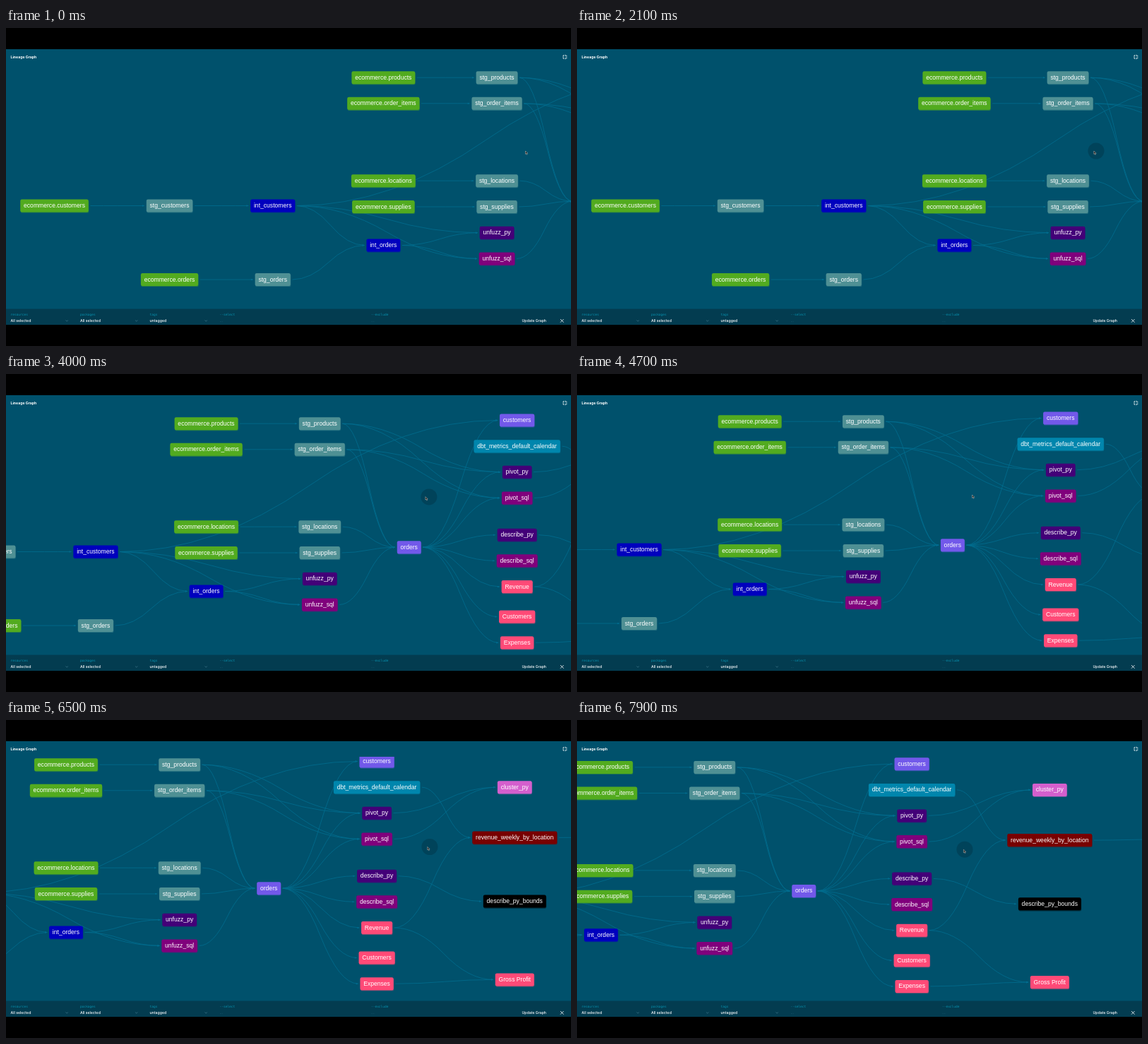
These frames come from a looping animation (800x450 px, 8000 ms). An HTML page:

```html
<!DOCTYPE html>
<html lang="en">
<head>
<meta charset="utf-8">
<title>Lineage Graph</title>
<style>
  html, body { margin: 0; height: 100%; overflow: hidden; background: #000; }
  svg { display: block; width: 800px; height: 450px; }
  #graph text { font: 8.6px "Liberation Sans", Arial, sans-serif; text-anchor: middle; fill: #fff; }
  #edges { fill: none; stroke: #027599; stroke-width: .8; opacity: .8; }
  #edges .tip { fill: #027599; stroke: none; }
  .ui text { font: 500 5.2px Inter, sans-serif; fill: #fff; }
  .ui .label { font: 4.5px "DejaVu Sans Mono", monospace; fill: #0893b0; }
  .ui path { fill: none; stroke: #fff; stroke-width: .8; }
  .ui .chevron { stroke: #4d8497; stroke-width: .6; }
  .ui .hint { fill: #2a6a7f; }
</style>
</head>
<body>
<svg viewBox="0 0 800 450">
  <clipPath id="view"><rect y="52" width="800" height="346"/></clipPath>
  <rect y="30" width="800" height="390" fill="#00516c"/>
  <g clip-path="url(#view)">
    <g id="graph"><g id="edges"></g><g id="nodes"></g></g>
  </g>
  <g class="ui" id="ui">
    <rect y="397.5" width="800" height="22.5" fill="#033c50"/>
    <text x="6.5" y="43" style="font-weight:700">Lineage Graph</text>
    <path d="M788 39.8h2v-2M794.500 39.800h-2v-2M788 42.200h2v2M794.500 42.200h-2v2"/>
    <text x="730.5" y="416">Update Graph</text>
    <path d="M785 412l4.600 4.600M789.600 412l-4.600 4.600"/>
  </g>
  <circle id="press" r="11.5" fill="#002f42" opacity=".4"/>
  <path id="cursor" d="M0 0V4.400L1 3.500 1.800 5.200 2.600 4.800 1.800 3.200H3.200Z" fill="#111" stroke="#d8d0c8" stroke-width=".5"/>
</svg>
<script>
const LOOP = 8000;
const $ = id => document.getElementById(id);
const green = '#52ab1f', teal = '#4f9094', blue = '#0000be', indigo = '#430078',
      purple = '#80007c', violet = '#7259ea', pink = '#ff4a77';

// Columns of the graph: centre x, then [label, y, colour]
const columns = [
  [68.5, ['ecommerce.customers', 251.5, green]],
  [231.5, ['stg_customers', 251.5, teal], ['ecommerce.orders', 356, green]],
  [377.7, ['int_customers', 251.5, blue], ['stg_orders', 356, teal]],
  [534.3, ['ecommerce.products', 70.2, green], ['ecommerce.order_items', 106.8, green],
    ['ecommerce.locations', 216.2, green], ['ecommerce.supplies', 253, green], ['int_orders', 307.5, blue]],
  [695, ['stg_products', 70.2, teal], ['stg_order_items', 106.8, teal], ['stg_locations', 216.2, teal],
    ['stg_supplies', 253, teal], ['unfuzz_py', 289.7, indigo], ['unfuzz_sql', 326.4, purple]],
  [821.5, ['orders', 245.2, violet]],
  [974.4, ['customers', 65.5, violet], ['dbt_metrics_default_calendar', 102.2, '#0086ad'],
    ['pivot_py', 138.7, indigo], ['pivot_sql', 175.4, purple], ['describe_py', 227.7, indigo],
    ['describe_sql', 264.3, purple], ['Revenue', 301, pink], ['Customers', 343.5, pink], ['Expenses', 380.2, pink]],
  [1169.6, ['cluster_py', 102.2, '#d45fcd'], ['revenue_weekly_by_location', 173.4, '#780000'],
    ['describe_py_bounds', 263.6, '#000'], ['Gross Profit', 374.4, pink]],
  [1345, ['', 172, '#000']]
];
const links = {
  'ecommerce.customers': 'stg_customers', 'stg_customers': 'int_customers',
  'ecommerce.orders': 'stg_orders', 'stg_orders': 'int_orders',
  'ecommerce.products': 'stg_products', 'ecommerce.order_items': 'stg_order_items',
  'ecommerce.locations': 'stg_locations', 'ecommerce.supplies': 'stg_supplies',
  'int_customers': 'int_orders,customers,unfuzz_py,unfuzz_sql',
  'int_orders': 'unfuzz_py,unfuzz_sql',
  'stg_products': 'orders,pivot_py,pivot_sql', 'stg_order_items': 'orders,pivot_py,pivot_sql',
  'stg_locations': 'orders', 'stg_supplies': 'orders', 'unfuzz_sql': 'orders',
  'orders': 'customers,pivot_py,pivot_sql,describe_py,describe_sql,Revenue,Customers,Expenses',
  'dbt_metrics_default_calendar': 'revenue_weekly_by_location',
  'pivot_py': 'cluster_py', 'pivot_sql': 'cluster_py', 'describe_py': 'describe_py_bounds',
  'Revenue': 'revenue_weekly_by_location,Gross Profit', 'Expenses': 'Gross Profit',
  'revenue_weekly_by_location': ''
};

const ruler = document.createElement('canvas').getContext('2d');
ruler.font = '86px "Liberation Sans", Arial, sans-serif';
const nodes = {};
for (const [x, ...items] of columns)
  for (const [label, y, color] of items)
    nodes[label] = { x, y, color, w: ruler.measureText(label).width / 10 + 9.5 };

$('nodes').innerHTML = Object.entries(nodes).map(([label, { x, y, w, color }]) => {
  const box = (dx, dy, opacity) =>
    `<rect x="${x - w / 2 + dx}" y="${y - 9 + dy}" width="${w}" height="18" rx="2.2" fill="${color}" opacity="${opacity}"/>`;
  return box(.5, 1.1, .45) + box(0, 0, 1) + `<text x="${x}" y="${y + 2.6}">${label}</text>`;
}).join('');

// Two quadratic halves, level at both ends
function edge(a, b) {
  const x0 = a.x + a.w / 2 + 2.7, x1 = b.x - b.w / 2 - 2.7, dx = x1 - x0;
  return `<path d="M${x0} ${a.y}Q${x0 + dx / 4} ${a.y} ${x0 + dx / 2} ${(a.y + b.y) / 2}T${x1} ${b.y}"/>` +
    `<path class="tip" d="M${x1} ${b.y}l-3 -1.300v2.600z"/>`;
}
$('edges').innerHTML = Object.entries(links).map(([from, to]) =>
  to.split(',').map(name => edge(nodes[from], nodes[name])).join('')).join('');

const label = (x, text) => `<text class="label" x="${x}" y="406.5">${text}</text>`;
const select = (x, name, value) => label(x, name) + `<text x="${x}" y="416">${value}</text>` +
  `<path class="chevron" d="M${x + 78} 413.500l1.700 1.500 1.700 -1.500"/>`;
const input = (x, name) => label(x, name) + `<text class="hint" x="${x}" y="416">...</text>`;
$('ui').insertAdjacentHTML('beforeend',
  select(6.5, 'resources', 'All selected') + select(105, 'packages', 'All selected') +
  select(203.5, 'tags', 'untagged') + input(302.5, '--select') + input(517, '--exclude'));

// Pointer path: time, x, y
const track = [
  [0, 736, 174], [1700, 736, 174], [2000, 735, 174], [2100, 735, 174], [2400, 660, 177],
  [2700, 586, 179.5], [2800, 575, 180], [2900, 573, 180], [3050, 573, 180], [3500, 687.7, 180],
  [3750, 687.7, 180], [3900, 618, 175], [4000, 599, 174], [4500, 560, 171], [4800, 560, 171],
  [5400, 759.3, 183.5], [5600, 759.3, 183.5], [5700, 719, 182.5], [5800, 702, 182],
  [6500, 600, 179.5], [7200, 568.5, 181], [7900, 549, 183.2], [8000, 547, 183.4]
];
// Press time, release time, pointer position that would mean no pan
const drags = [[2000, 2950, 735, 174], [3720, 4600, 849.7, 174], [5580, LOOP, 1049.3, 186.5]];

// Monotone cubic interpolation along the track
function pointer(t) {
  t = Math.min(t, LOOP);
  const i = Math.max(1, track.findIndex(k => k[0] >= t));
  const a = track[i - 1], b = track[i], h = b[0] - a[0], u = (t - a[0]) / h;
  return [1, 2].map(c => {
    const slope = j => track[j] && track[j - 1] ? (track[j][c] - track[j - 1][c]) / (track[j][0] - track[j - 1][0]) : 0;
    const tangent = j => {
      const p = slope(j), q = slope(j + 1);
      return p * q > 0 ? 2 * p * q / (p + q) : 0;
    };
    const s = u * u * (3 - 2 * u);
    return a[c] + (b[c] - a[c]) * s + h * u * (1 - u) * (tangent(i - 1) * (1 - u) - tangent(i) * u);
  });
}

const move = (id, x, y) => $(id).setAttribute('transform', `translate(${x} ${y})`);

function draw(now) {
  const t = now % LOOP;
  let pan = [0, 0], pressed = false;
  for (const [from, to, x, y] of drags) {
    if (t < from) break;
    const p = pointer(Math.min(t, to));
    pan = [p[0] - x, p[1] - y];
    pressed = t < to;
  }
  const [x, y] = pointer(t), [cx, cy] = pointer(t + 40);
  move('graph', ...pan);
  move('press', x, y);
  move('cursor', cx - .5, cy);
  $('press').style.display = pressed ? '' : 'none';
}

const start = performance.now();
function tick() {
  draw(performance.now() - start);
  requestAnimationFrame(tick);
}
tick();
</script>
</body>
</html>
```
